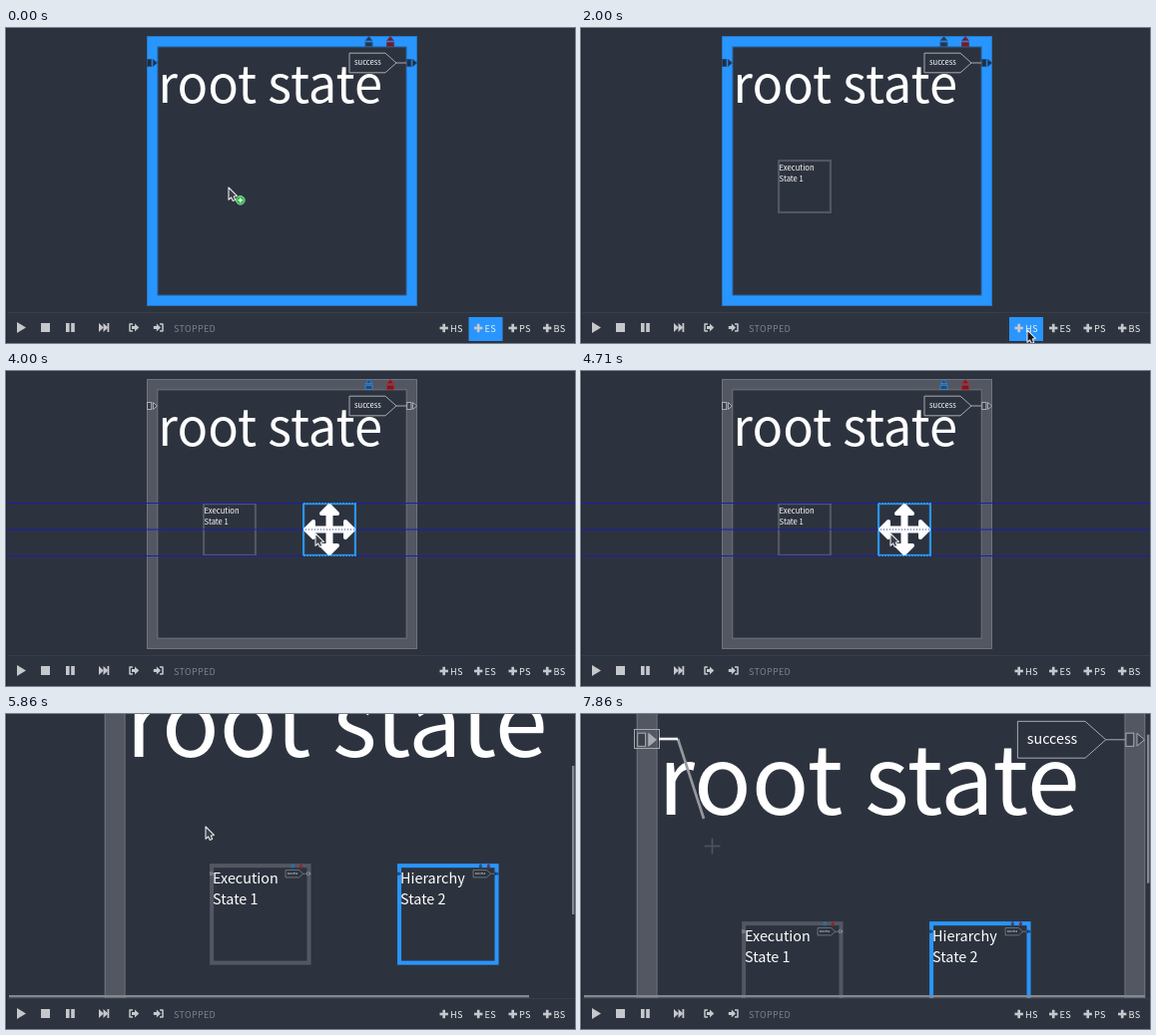
An HTML page with a canvas that plays this animation: 570 px wide and 316 px high, repeating every 8 s.

```html
<!DOCTYPE html>
<html lang="en">
<head>
<meta charset="utf-8">
<title>State machine editor</title>
<style>
  html, body { margin: 0; width: 100%; height: 100%; overflow: hidden; background: #2d333e; }
  canvas { display: block; width: 570px; height: 316px; }
</style>
</head>
<body>
<canvas id="stage"></canvas>
<script>
const W = 570, H = 316, FPS = 7, STEPS = 56;
const BG = '#2d333e', BLUE = '#2995ff', GRAY = '#525762', EDGE = '#70747e', ICON = '#c6c8cc';
const FONT = '"Noto Sans CJK JP", "Noto Sans CJK SC", "Noto Sans CJK", "Open Sans", sans-serif';

const ROOT = { x: 141, y: 8, size: 271 };
const CHILD = 54, ROW = 132, ZOOM = 1.88;
const FOCUS = { x: 189, y: 111.4 };
const FIRST_DROP = [223, 160], SECOND_DROP = [309, 142], BUTTON = [447, 303], PORT = [66, 25];

const canvas = document.getElementById('stage');
const c = canvas.getContext('2d');
const ratio = window.devicePixelRatio || 1;
canvas.width = W * ratio;
canvas.height = H * ratio;

const progress = (step, from, to) => Math.min(1, Math.max(0, (step - from) / (to - from)));
const smooth = k => k * k * (3 - 2 * k);
const easeOut = k => 1 - Math.pow(1 - k, 2.4);
const mix = (a, b, kx, ky = kx) => [a[0] + (b[0] - a[0]) * kx, a[1] + (b[1] - a[1]) * ky];

function panProgress(step) {
  const k = progress(step, 42, 48);
  return [k, easeOut(k)];
}

function pointerAt(step) {
  let p = FIRST_DROP;
  const go = (from, to, target, ease = smooth) => { p = mix(p, target, ease(progress(step, from, to))); };
  go(5, 8, [255, 222]);
  go(8, 14, BUTTON);
  go(15, 21, SECOND_DROP);
  go(22, 25, [295, 146]);
  go(26, 28, [310, 163]);
  go(34, 41, [200, 113], easeOut);
  p = mix(p, [185, 155], ...panProgress(step));
  go(48, 52, PORT);
  go(53, 55, [131, 132]);
  return p;
}

function rect(x, y, w, h, color) {
  c.fillStyle = color;
  c.fillRect(x, y, w, h);
}

function text(str, x, y, size, color = '#fff', spacing = 0) {
  c.font = `${size}px ${FONT}`;
  c.letterSpacing = `${spacing}px`;
  c.fillStyle = color;
  c.fillText(str, x, y);
}

function poly(points, fill, stroke, width = 1, closed = true) {
  c.beginPath();
  points.forEach(([x, y]) => c.lineTo(x, y));
  if (closed) c.closePath();
  if (fill) { c.fillStyle = fill; c.fill(); }
  if (stroke) { c.strokeStyle = stroke; c.lineWidth = width; c.stroke(); }
}

const line = (from, to, color, width) => poly([from, to], null, color, width, false);

function triangle(x, y, w, h, fill, stroke, width) {
  poly([[x, y - h], [x + w, y], [x, y + h]], fill, stroke, width);
}

function plus(x, y, r, w, color) {
  rect(x - r, y - w / 2, r * 2, w, color);
  rect(x - w / 2, y - r, w, r * 2, color);
}

function port(x, y, angle, fill, stroke, width, tip = fill) {
  c.save();
  c.translate(x, y);
  c.rotate(angle);
  rect(-4.9, -3.5, 4.2, 7, fill);
  c.strokeStyle = stroke;
  c.lineWidth = width;
  c.strokeRect(-4.9, -3.5, 4.2, 7);
  triangle(1, 0, 4, 3.4, tip, stroke, width);
  c.restore();
}

// Frame with ports and outcome, laid out on a square of the root's size
function stateBox(x, y, size, selected, px, detail, hot) {
  const full = ROOT.size, s = size / full, thin = px / s, border = 10.8, inner = full - 2 * border;
  c.save();
  c.translate(x, y);
  c.scale(s, s);
  rect(0, 0, full, full, selected ? BLUE : GRAY);
  rect(border, border, inner, inner, BG);
  if (size === full) {
    c.lineWidth = thin;
    c.strokeStyle = selected ? '#2478c8' : EDGE;
    c.strokeRect(thin / 2, thin / 2, full - thin, full - thin);
    c.strokeRect(border, border, inner, inner);
  }
  if (detail) {
    const fill = selected ? '#252d39' : '#3b404b';
    const edge = selected ? '#1d4f84' : '#aaadb3';
    const w = Math.min(thin, 1.4);
    poly([[203, 17.2], [239, 17.2], [250, 27], [239, 36.8], [203, 36.8]], BG, '#a7aab0', w);
    line([250, 27], [full - border, 27], '#a7aab0', w);
    text('success', 208, 29.4, 7.6);
    port(border / 2, 27, 0, fill, edge, w, hot ? '#a8aaad' : fill);
    port(full - border / 2, 27, 0, fill, edge, w);
    port(222.5, 5.6, -Math.PI / 2, selected ? '#2b3542' : '#1c4b80', selected ? '#25588e' : '#3484cf', w);
    port(244, 5.6, -Math.PI / 2, '#7c171f', selected ? '#5a3c62' : '#a82a31', w);
  }
  c.restore();
}

function label(lines, x, y) {
  lines.forEach((str, i) => text(str, x + 1.6, y + 10.7 + i * 11.05, 7.65));
}

function moveIcon(x, y) {
  c.save();
  c.translate(x, y);
  c.lineJoin = 'round';
  plus(0, 0, 18, 7, '#fff');
  for (let i = 0; i < 4; i++) {
    c.rotate(Math.PI / 2);
    triangle(16, 0, 8, 8, '#fff', '#fff', 4);
  }
  c.restore();
}

function guides(from, to, color, dash = []) {
  c.setLineDash(dash);
  for (let i = 0; i < 3; i++) {
    const y = ROW + 0.5 + i * 26.5;
    line([from, y], [to, y], color, 1);
  }
  c.setLineDash([]);
}

function doorIcon(x, side) {
  c.save();
  c.translate(x, 300.5);
  c.lineJoin = 'round';
  poly([[side, -3.6], [side * 4, -3.6], [side * 4, 3.6], [side, 3.6]], null, ICON, 1.5, false);
  const shift = side > 0 ? -3.2 : 0;
  rect(shift - 2, -1.5, 3.4, 3, ICON);
  triangle(shift + 1, 0, 4.2, 4, ICON);
  c.restore();
}

function toolbar(active) {
  rect(0, 285, W, H - 285, '#2e343f');
  rect(0, 285, W, 1, '#383e49');
  triangle(11, 300.5, 9, 5.5, ICON);
  rect(35, 296, 9, 9, ICON);
  [60, 65.2].forEach(x => rect(x, 296, 3.6, 9, ICON));
  [93, 97.5].forEach(x => triangle(x, 300.5, 4.8, 4.5, ICON));
  rect(101.5, 296, 1.8, 9, ICON);
  doorIcon(128, -1);
  doorIcon(153, 1);
  text('STOPPED', 168, 305, 9, '#7d828c', 0.3);
  ['HS', 'ES', 'PS', 'BS'].forEach((name, i) => {
    const x = 429 + i * 34.5;
    if (name === active) rect(x, 290, 34, 24, BLUE);
    plus(x + 9.7, 301, 4.2, 2.6, ICON);
    text(name, x + 16, 305, 9.2, '#eceef0', 0.3);
  });
}

function arrow(x, y, adding, dark) {
  c.save();
  c.translate(x, y);
  c.lineJoin = 'round';
  poly([[0, 0], [0, 12.2], [2.7, 10], [4.2, 13.4], [6.6, 12.4], [5.3, 9], [8.4, 8.4]],
    dark ? '#171a20' : '#3b3f48', '#e8e9eb', 1.1);
  if (adding) {
    c.beginPath();
    c.arc(11.8, 12.8, 4.3, 0, Math.PI * 2);
    c.fillStyle = '#2fb84c';
    c.fill();
    c.strokeStyle = '#8ee59d';
    c.lineWidth = 1;
    c.stroke();
    plus(11.8, 12.8, 2.4, 1.2, '#fff');
  }
  c.restore();
}

function scrollbars(dx, dy) {
  rect(3, 282, 521 - dx * 0.95, 2.4, '#858890');
  rect(567, 52 - dy * 0.54, 2.4, 149, '#858890');
}

function connection(k) {
  const [x, y] = PORT;
  c.strokeStyle = '#a5a8ae';
  c.lineWidth = 1;
  c.strokeRect(x - 12.5, y - 9.5, 25, 19);
  if (!k) return;
  const bend = [x + 31, y];
  line(bend, mix(bend, [123, 105], k), '#96999f', 2.6);
  line([x + 12, y], bend, '#f2f2f3', 2.6);
}

function drawMachine(step, zoom) {
  const rootSelected = step < 1 || (step >= 8 && step < 22);
  const dragging = step >= 26 && step < 34;
  const snapped = step >= 28 && step < 34;
  const detail = zoom > 1.3, unit = 1 / zoom;

  stateBox(ROOT.x, ROOT.y, ROOT.size, rootSelected, unit, true, step >= 52);
  text('root state', 152.3, 74.9, 50.7);
  if (step >= 1) {
    stateBox(197, ROW, CHILD, step < 8, unit, detail);
    label(['Execution', 'State 1'], 197, ROW);
  }
  if (snapped) guides(1, W, '#1b1db0');
  if (step >= 22) {
    const dropped = SECOND_DROP.map(v => v - CHILD / 2);
    const [x, y] = mix(dropped, [297, ROW], smooth(progress(step, 26, 28)));
    stateBox(x, y, CHILD, true, unit, detail);
    if (dragging) moveIcon(x + CHILD / 2, y + CHILD / 2);
    else label(['Hierarchy', 'State 2'], x, y);
    if (snapped) guides(x, x + CHILD, '#25408f', [1, 2]);
  }
}

function draw(step) {
  const [px, py] = pointerAt(step);
  const [dx, dy] = mix([0, 0], [-43, 58], ...panProgress(step));
  const zoom = Math.pow(ZOOM, progress(step, 37, 40));

  c.setTransform(ratio, 0, 0, ratio, 0, 0);
  rect(0, 0, W, H, BG);
  c.save();
  c.translate(FOCUS.x * (1 - zoom) + dx, FOCUS.y * (1 - zoom) + dy);
  c.scale(zoom, zoom);
  drawMachine(step, zoom);
  c.restore();

  if (step >= 52) connection(progress(step, 53, 55));
  if (zoom > 1) scrollbars(dx, dy);
  toolbar(step < 2 || step === 12 ? 'ES' : step >= 13 && step < 22 ? 'HS' : '');
  rect(0, 0, 1, H, '#242933');

  if (step >= 53) plus(px + 0.5, py + 0.5, 8, 1.8, '#4c515b');
  else arrow(px, py, step < 1 || (step >= 16 && step < 22), step >= 13 && step < 16);
}

// Steps begin on times rounded to 10 ms, so allow a little lead
function tick(now) {
  draw(Math.floor((now + 4) * FPS / 1000) % STEPS);
  requestAnimationFrame(tick);
}
requestAnimationFrame(tick);
</script>
</body>
</html>
```
